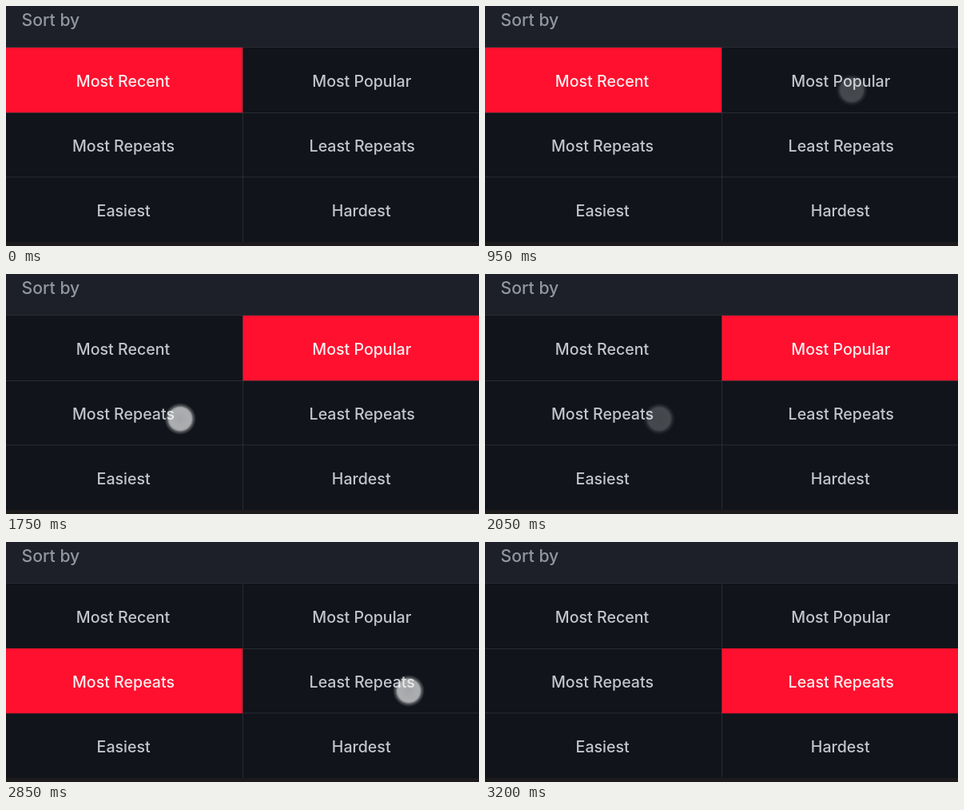
Recreate the animation shown at these times as an HTML page. Size 592 by 300 pixels, loop 3450 ms.

```html
<!DOCTYPE html>
<html lang="en">
<head>
<meta charset="utf-8">
<title>Sort by</title>
<style>
  html, body { margin: 0; width: 100%; height: 100%; overflow: hidden; background: #11141b; }
  svg { display: block; width: 100vw; height: 100vh; }
  text { font: 500 19.6px Inter, Roboto, sans-serif; fill: #c3c5ca; }
  .cell { text-anchor: middle; }
  .title { font-size: 21.2px; fill: #9297a2; }
  .lines { stroke: #2a2c32; stroke-width: 1; }

  .pick, .dot, .recent, .popular, .most, .least {
    animation: 3450ms step-end infinite;
  }
  .pick { fill: #ff102e; animation-name: pick; }
  .dot { opacity: 0; animation-name: move, tap; }
  .recent { animation-name: recent; }
  .popular { animation-name: popular; }
  .most { animation-name: most; }
  .least { animation-name: least; }

  /* Selected cell: a new one every 1100 ms, 350 ms after each touch */
  @keyframes pick {
    0% { transform: translate(0, 0); }
    28.98% { transform: translate(296.5px, 0); }
    60.86% { transform: translate(0, 81px); }
    92.75%, 100% { transform: translate(296.5px, 81px); }
  }
  @keyframes recent {
    0% { fill: #fbeef0; }
    28.98%, 100% { fill: #c3c5ca; }
  }
  @keyframes popular {
    0%, 60.86%, 100% { fill: #c3c5ca; }
    28.98% { fill: #fbeef0; }
  }
  @keyframes most {
    0%, 92.75%, 100% { fill: #c3c5ca; }
    60.86% { fill: #fbeef0; }
  }
  @keyframes least {
    0% { fill: #c3c5ca; }
    92.75%, 100% { fill: #fbeef0; }
  }

  /* Touch point: where it lands, then show and fade */
  @keyframes move {
    0% { transform: translate(459px, 105px); }
    40% { transform: translate(218px, 181px); }
    70%, 100% { transform: translate(504px, 186px); }
  }
  @keyframes tap {
    0%, 28.98%, 60.86%, 92.75%, 100% { opacity: 0; }
    18.84%, 50.72%, 82.6% { opacity: 1; }
    24.63%, 56.52%, 88.4% { opacity: .8; }
    26.08%, 57.97%, 89.85% { opacity: .57; }
    27.53%, 59.42%, 91.3% { opacity: .34; }
  }
</style>
</head>
<body>
<svg viewBox="0 0 592 300" preserveAspectRatio="none">
  <defs>
    <radialGradient id="glow">
      <stop offset="0" stop-color="#fff" stop-opacity=".62"/>
      <stop offset=".64" stop-color="#fff" stop-opacity=".66"/>
      <stop offset=".72" stop-color="#fff" stop-opacity=".6"/>
      <stop offset=".82" stop-color="#fff" stop-opacity=".27"/>
      <stop offset="1" stop-color="#fff" stop-opacity="0"/>
    </radialGradient>
  </defs>

  <rect width="592" height="300" fill="#11141b"/>
  <rect width="592" height="52" fill="#1e2029"/>
  <rect y="295" width="592" height="5" fill="#1d1b1c"/>
  <path class="lines" d="M0 51.5H592M0 133.5H592M0 213.8H592M296.5 52V294"/>
  <rect class="pick" y="52" width="296" height="81.2"/>

  <text class="title" x="19.5" y="24.5">Sort by</text>
  <text class="cell recent" x="146.5" y="100.5">Most Recent</text>
  <text class="cell popular" x="445.3" y="100.5">Most Popular</text>
  <text class="cell most" x="147" y="181.5">Most Repeats</text>
  <text class="cell least" x="445.7" y="181.5">Least Repeats</text>
  <text class="cell" x="147.2" y="262.5">Easiest</text>
  <text class="cell" x="444.7" y="262.5">Hardest</text>

  <circle class="dot" r="20" fill="url(#glow)"/>
</svg>
</body>
</html>
```
